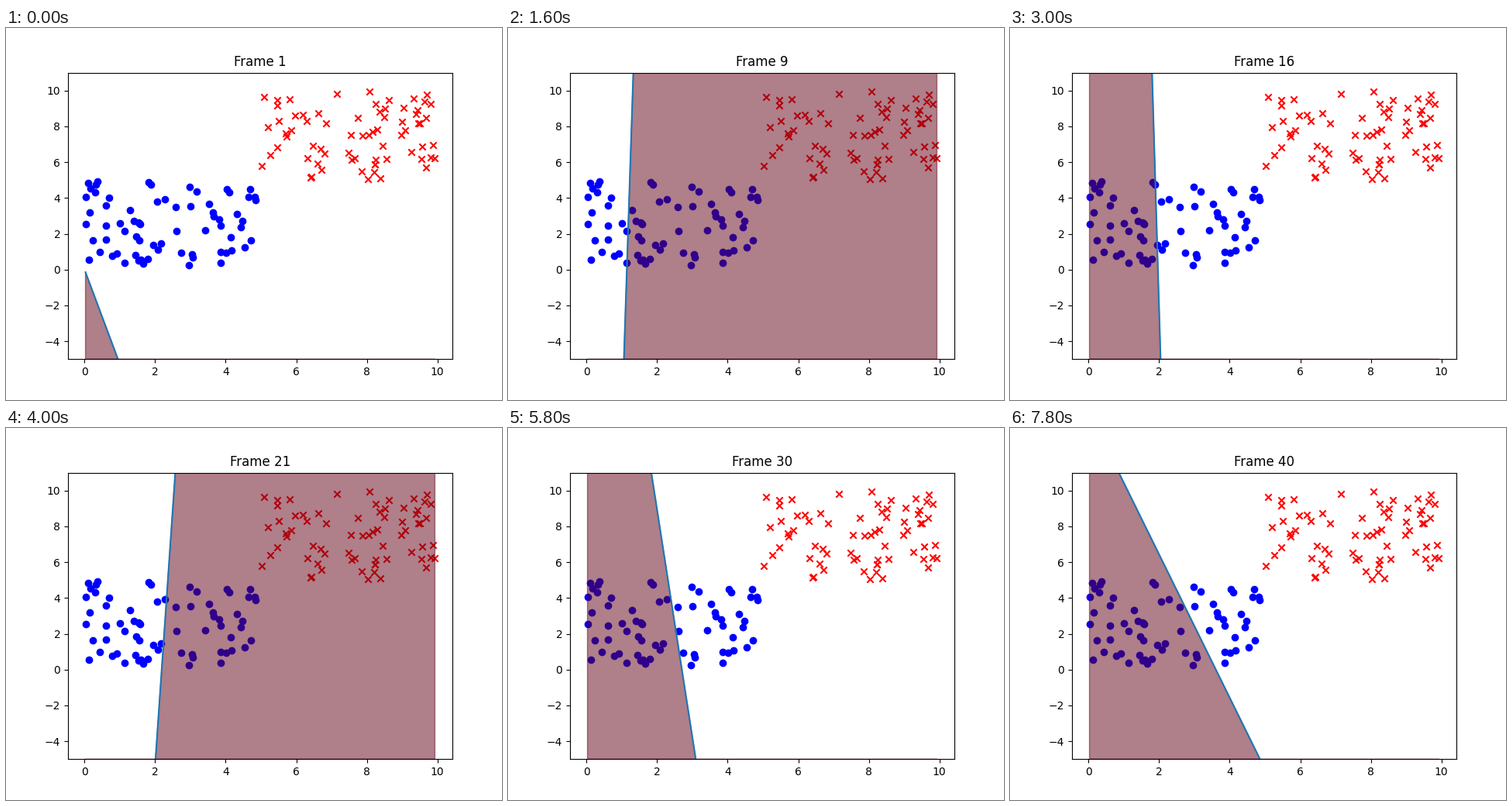
These frames come from a looping animation (640 px wide and 480 px high, 8000 ms). A matplotlib script:

```python
import numpy as np
import matplotlib.pyplot as plt
from matplotlib.animation import FuncAnimation

EPOCHS = 40
COUNT = 70
FLOOR, CEILING = -5, 11

np.random.seed(42)
blue = np.random.rand(COUNT, 2) * 5
red = np.random.rand(COUNT, 2) * 5 + 5
points = np.vstack([blue, red])
labels = np.repeat([1, -1], COUNT)


def train():
    """Return the perceptron's weights and bias after each epoch."""
    w, b = np.zeros(2), 0.0
    history = []
    for _ in range(EPOCHS):
        for p, label in zip(points, labels):
            if label * (w @ p + b) <= 0:
                w = w + label * p
                b += label
        history.append((w, b))
    return history


history = train()
xs = np.array([points[:, 0].min(), points[:, 0].max()])

fig, ax = plt.subplots(figsize=(6.4, 4.8), dpi=100)
ax.scatter(*blue.T, color="blue", marker="o")
ax.scatter(*red.T, color="red", marker="x")
line, = ax.plot(xs, [0, 0])
area = ax.fill_between(xs, [0, 0], FLOOR, color="#610017", alpha=0.5)
title = ax.set_title("")
margin = 0.05 * np.ptp(xs)
ax.set_xlim(xs[0] - margin, xs[1] + margin)
ax.set_ylim(FLOOR, CEILING)


def update(i):
    w, b = history[i]
    ys = -(w[0] * xs + b) / w[1]
    line.set_ydata(ys)
    area.set_verts([[(xs[0], FLOOR), (xs[0], ys[0]),
                     (xs[1], ys[1]), (xs[1], FLOOR)]])
    title.set_text(f"Frame {i + 1}")
    return line, area, title


anim = FuncAnimation(fig, update, frames=EPOCHS, interval=200,
                     repeat=True, repeat_delay=0)
plt.show()
```
